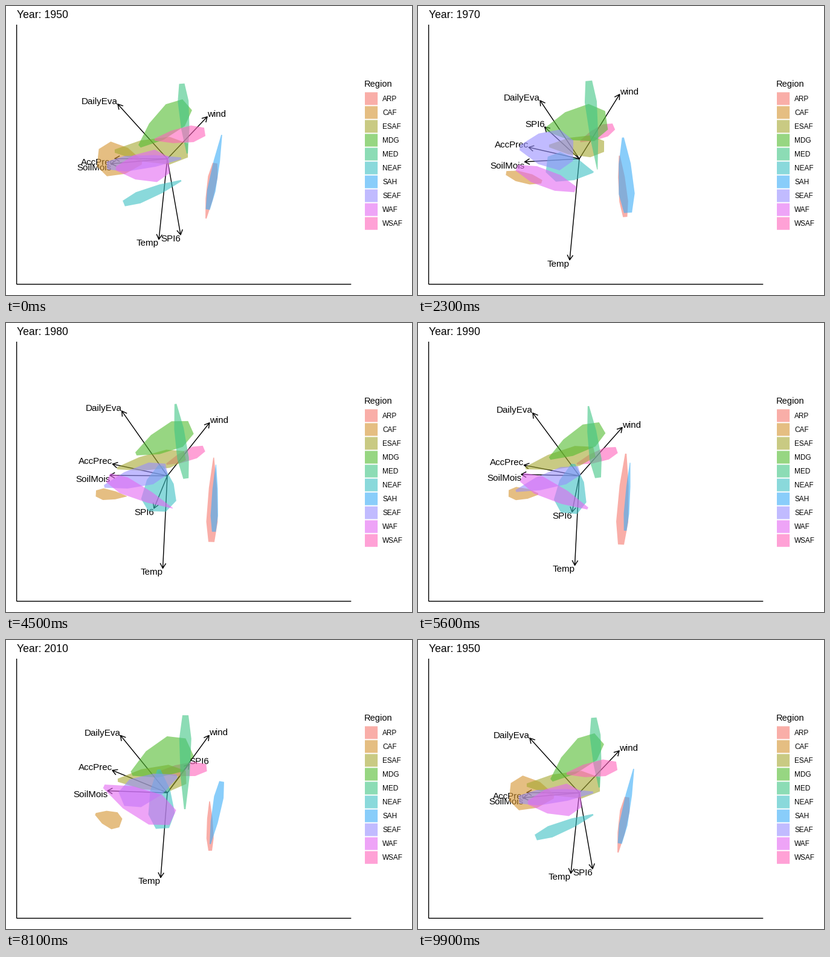
Animation of 672x480 px, one loop 10000 ms. Source, as a matplotlib script:

```python
import numpy as np
import matplotlib.pyplot as plt
from matplotlib.animation import FuncAnimation
from matplotlib.patches import Polygon, Rectangle

W, H, DPI = 672, 480, 96
FRAMES, INTERVAL = 100, 100
ORIGIN = np.array([267, 253.8])
MID = np.array([294.5, 246.7])
LINE, HEAD, CAP = 1.07, 9.45, 10.9
KEY_STEP, KEY_SIZE = 23.04, 21.1
YEARS = range(1950, 2030, 10)
# First moving frame and number of steps of each change of year
MOVES = [(5, 10), (18, 10), (31, 11), (44, 9), (56, 10), (69, 9), (81, 9), (93, 7)]
# Half width of a hull at places along its spine
PROFILE = [(0, 0.12), (0.35, 0.75), (0.75, 1), (1, 0.5)]

plt.rcParams["font.family"] = "Liberation Sans"
fig = plt.figure(figsize=(W / DPI, H / DPI), dpi=DPI, facecolor="white")
ax = fig.add_axes([0, 0, 1, 1])
ax.set_xlim(0, W)
ax.set_ylim(H, 0)
ax.axis("off")


def mix(a, b, t):
    return a + (b - a) * t


def undo(moved, goal, t):
    """The pose from which a share t of the way to goal leads to moved."""
    return (moved - t * goal) / (1 - t)


def hull(x0, y0, x1, y1, half):
    """Convex corners around a spine that runs from a tip to a blunt end."""
    tip, end = np.array([x0, y0]), np.array([x1, y1])
    dx, dy = (end - tip) / np.hypot(*(end - tip))
    side = half * np.array([-dy, dx])
    left = [mix(tip, end, s) + w * side for s, w in PROFILE]
    right = [mix(tip, end, s) - w * side for s, w in PROFILE]
    return np.array(left + right[::-1])


def align(p, ref):
    """Turn the corner order of p to lie closest to ref."""
    turns = [np.roll(p, k, axis=0) for k in range(len(p))]
    return min(turns, key=lambda r: np.sum((r - ref) ** 2))


def key_poses(y50, y60, mid, y90, y00, y10, end):
    """Poses at rest; from the third on they were given shortly after leaving."""
    y10 = undo(y10, end, 1 / 18)
    y20 = mix(y10, end, 0.5)
    y00 = undo(y00, y10, 1 / 9)
    y90 = undo(y90, y00, 1 / 10)
    y80 = mix(mid, y90, 0.7)
    y70 = undo(mid, y80, 3 / 11)
    return [y50, y60, y70, y80, y90, y00, y10, y20, end]


regions, arrows = [], []


def region(name, color, *spines):
    poses = [hull(*s) for s in spines + spines[:1]]
    for i in range(1, len(poses)):
        poses[i] = align(poses[i], poses[i - 1])
    keys = key_poses(*poses)
    style = dict(facecolor=color, alpha=0.6, lw=0, snap=False)
    patch = ax.add_patch(Polygon(keys[0], closed=True, **style))
    top = 143.3 + KEY_STEP * len(regions)
    ax.add_patch(Rectangle((594, top), KEY_SIZE, KEY_SIZE, **style))
    ax.text(623, top + 14.8, name, size=8.8)
    regions.append((patch, keys))


def arrow(name, *tips):
    keys = key_poses(*[np.array(p) for p in tips + tips[:1]])
    line, = ax.plot([], [], color="black", lw=LINE, zorder=1,
                    solid_capstyle="butt", solid_joinstyle="round")
    label = ax.text(0, 0, name, size=11.38, zorder=2)
    arrows.append((line, label, keys))


arrow("DailyEva", (185, 163), (199, 158.5), (201, 153.5), (190, 149.5), (199.5, 195.5), (189.5, 158.5))
arrow("wind", (333, 184), (333.5, 147), (334.5, 151.5), (338, 173.5), (342, 198.5), (336, 158.5))
arrow("AccPrec", (180, 253.5), (182.5, 239), (182, 232.5), (175.5, 236), (181.5, 242.5), (176, 216.5))
arrow("SoilMois", (174, 262), (175.5, 256.5), (176, 258.5), (171, 251.5), (172.5, 252), (168, 250.5))
arrow("Temp", (253, 387.5), (252.5, 418), (252.5, 420), (259.5, 402.5), (242, 394.5), (256, 394.5))
arrow("SPI6", (289, 380), (219, 211.5), (214, 223), (255, 314), (265.5, 143.5), (303, 206))

# Each spine: tip, blunt end, half width
region("ARP", "#F5786F",
       (331, 353, 346, 261, 8), (329.5, 243, 327, 346, 9), (338, 245, 350, 356, 7),
       (344, 217, 336, 368, 10), (329, 382, 331, 222, 10.5), (337, 268, 338, 350, 6))
region("CAF", "#D5932F",
       (225, 260, 152, 252, 29), (141, 273, 210, 302, 11), (201, 286, 149, 281, 9.5),
       (199, 284, 150, 283, 11), (190, 238, 170, 290, 17), (148, 289, 190, 304, 15))
region("ESAF", "#A5A830",
       (180, 241, 301, 240, 23), (236, 232, 298, 231, 29), (199, 235, 310, 231, 12),
       (178, 241, 292, 214, 17), (169, 222, 291, 192, 22), (185, 233, 298, 228, 22))
region("MDG", "#52BB2F",
       (221, 233, 300, 164, 24), (224, 225, 311, 187, 24), (207, 198, 311, 187, 33),
       (218, 225, 305, 174, 21), (220, 238, 309, 212, 24), (208, 222, 304, 178, 32))
region("MED", "#3FC584",
       (300, 245, 291, 129, 9), (297, 264, 285, 128, 8), (297, 272, 281, 125, 10.5),
       (282, 138, 298, 257, 10), (297, 283, 296, 142, 11), (296, 281, 297, 125, 10))
region("NEAF", "#3CC1C3",
       (290, 290, 195, 328, 10), (281, 270, 203, 250, 28), (292, 281, 222, 273, 27),
       (257, 234, 250, 316, 27), (252, 309, 255, 250, 33), (253, 215, 259, 313, 22))
region("SAH", "#3AADF8",
       (357, 214, 334, 338, 7), (350, 216, 355, 344, 12), (336, 224, 343, 344, 12),
       (351, 232, 343, 345, 4.5), (331, 324, 352, 179, 7), (338, 339, 357, 235, 8))
region("SEAF", "#988FFF",
       (290, 253, 167, 265, 13), (148, 241, 243, 228, 32), (177, 242, 266, 247, 31),
       (162, 279, 267, 245, 15), (196, 267, 279, 273, 16), (283, 226, 191, 264, 25))
region("WAF", "#E467F3",
       (182, 270, 270, 264, 27), (173, 272, 282, 314, 17), (254, 301, 160, 264, 15),
       (281, 308, 172, 256, 16), (170, 262, 267, 292, 37), (162, 243, 276, 295, 27))
region("WSAF", "#FF62BB",
       (246, 222, 329, 209, 14), (260, 220, 326, 207, 13), (272, 230, 324, 199, 10),
       (263, 234, 329, 211, 10.5), (256, 218, 331, 207, 11), (252, 220, 332, 212, 12))

ax.plot([17.6, 17.6], [31, 462.2], color="black", lw=LINE, solid_capstyle="butt", snap=False)
ax.plot([17.6, 571.3], [462.2, 462.2], color="black", lw=LINE, solid_capstyle="butt", snap=False)
ax.text(593, 134, "Region", size=11)
title = ax.text(17.6, 20, "", size=13.2)

# At rest hulls stack by number, on the move by the number read as text
REST = range(1, len(regions) + 1)
MOVING = sorted(REST, key=str)


def progress(frame):
    """Index of the year left behind and the share of the move done."""
    state = (0, 0.0)
    for i, (start, steps) in enumerate(MOVES):
        if frame >= start:
            state = (i, min(1.0, (frame - start + 1) / steps))
    return state


def place_arrow(line, label, tip):
    back = ORIGIN - tip
    heading = np.arctan2(back[1], back[0])
    barbs = [tip + HEAD * np.array([np.cos(a), np.sin(a)])
             for a in (heading - np.pi / 6, heading + np.pi / 6)]
    gap = np.full(2, np.nan)
    line.set_data(*np.array([ORIGIN, tip, gap, barbs[0], tip, barbs[1]]).T)
    # Labels sit on the side of the tip that faces away from the panel centre
    label.set_ha("right" if tip[0] < MID[0] else "left")
    label.set_position((tip[0], tip[1] + (CAP if tip[1] > MID[1] else 0)))


def draw(frame):
    i, t = progress(frame)
    title.set_text(f"Year: {YEARS[(i + (t > 0.5)) % len(YEARS)]}")
    order = MOVING if 0 < t < 1 else REST
    for number, (patch, keys) in enumerate(regions, 1):
        patch.set_xy(mix(keys[i], keys[i + 1], t))
        patch.set_zorder(3 + order.index(number))
    for line, label, keys in arrows:
        place_arrow(line, label, mix(keys[i], keys[i + 1], t))
    return []


anim = FuncAnimation(fig, draw, frames=FRAMES, interval=INTERVAL, repeat=True, blit=False)
plt.show()
```
